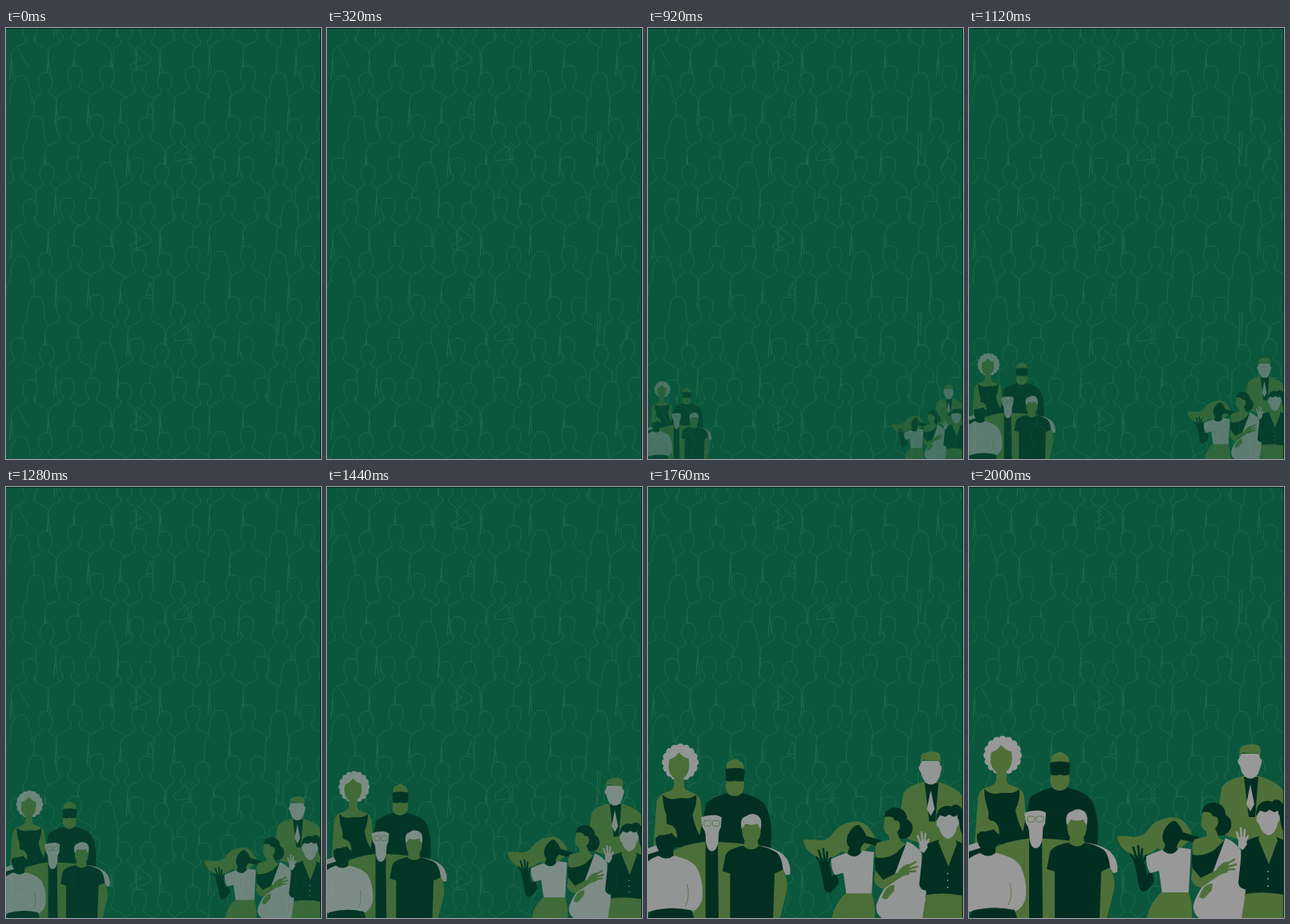
These frames come from a looping animation (393x538 px, 5000 ms). An HTML page:

```html
<!DOCTYPE html>
<html lang="en">
<head>
<meta charset="utf-8">
<title>Crowd</title>
<style>
html, body { margin: 0; width: 100%; height: 100%; overflow: hidden; background: #0a573d; }
svg { display: block; width: 100%; height: 100%; }
.crowd path { fill: #0a573d; stroke: #216b4c; stroke-width: .85; stroke-linejoin: round; }
.crowd .open { fill: none; }
.o { fill: #4e7038; }
.d { fill: #022e21; }
.g { fill: #989898; }
.line { fill: none; stroke: #4e7038; stroke-width: .8; }
.hand { fill: none; stroke-linecap: round; stroke-width: 2.6; }
.hand.d { stroke: #022e21; fill: none; }
.hand.g { stroke: #989898; fill: none; }
.hand.o { stroke: #4e7038; fill: none; }
</style>
</head>
<body>
<svg viewBox="0 0 393 538" preserveAspectRatio="none">
  <rect width="393" height="538" fill="#0a573d"/>
  <g class="crowd" id="crowd"></g>

  <g id="left">
    <!-- woman with curls -->
    <g class="g" id="curls"></g>
    <path class="o" d="M34 356 L34 366 Q33 372 24 374 Q12 377 11 390 L7 446 L74 446 L69 388 Q68 377 57 374 Q47 372 47 366 L47 356 Z"/>
    <path class="o" d="M40 322 Q46 329 53 330 Q56 347 47 355 Q40 361 33 355 Q24 347 28 331 Q36 329 40 322 Z"/>
    <path class="d" d="M19 377 Q25 383 34 383 Q42 381 50 382 Q58 382 63 377 Q64 390 58 403 Q60 420 76 446 L20 446 Q25 420 24 404 Q19 390 19 377 Z"/>
    <!-- bearded man -->
    <path class="d" d="M103 375 Q83 381 76 388 L64 446 L160 446 Q163 412 154 393 Q148 381 122 375 Z"/>
    <path class="o" d="M103 346 Q100 334 108 333 Q114 328 119 333 Q126 335 125 346 Z"/>
    <path class="d" d="M101 344 Q113 341 126 344 L125 362 L102 362 Z"/>
    <path class="o" d="M102 359 Q108 361 113 359 Q119 361 125 359 Q127 372 120 377 Q113 381 106 377 Q99 372 102 359 Z"/>
    <!-- older man in a jacket -->
    <path class="g" d="M140 443 Q166 446 177 456 Q187 466 185 481 L180 482 Q175 472 162 468 L145 466 Z"/>
    <path class="o" d="M72 439 Q46 442 32 451 L34 538 L166 538 L160 449 Q132 440 95 439 Z"/>
    <path class="d" d="M75 440 L91 440 L92 538 L75 538 Z"/>
    <path class="g" d="M69 407 Q75 404 83 404 Q91 403 96 407 L95 420 Q92 424 92 431 Q92 450 83 451 Q75 450 75 430 Q74 423 71 420 Z"/>
    <rect class="line" x="73" y="411" width="9" height="7" rx="2"/>
    <rect class="line" x="84" y="411" width="9" height="7" rx="2"/>
    <!-- man in a sweater -->
    <path class="g" d="M0 447 L12 443 L16 454 L0 459 Z"/>
    <path class="d" d="M0 455 L16 450 L16 462 L0 467 Z"/>
    <path class="g" d="M13 457 Q3 461 0 464 L0 530 L58 530 Q70 523 71 510 Q72 490 65 475 Q60 463 35 457 Z"/>
    <path class="line" d="M51 494 Q55 509 49 522"/>
    <path class="d" d="M4 529 Q30 522 57 528 L60 538 L0 538 Z"/>
    <path class="d" d="M10 430 L37 430 Q38 444 33 450 L33 457 Q24 464 14 457 L14 450 Q9 444 10 430 Z"/>
    <path class="o" d="M9 434 Q7 420 15 417 Q20 408 26 416 Q38 417 38 434 Q33 431 31 427 Q23 431 16 427 Q14 432 9 434 Z"/>
    <!-- man in a T-shirt -->
    <path class="o" d="M162 476 L176 474 Q183 490 181 502 L172 538 L160 538 Z"/>
    <path class="d" d="M123 444 Q104 448 101 456 L97 477 L107 480 L107 538 L163 538 L165 480 L176 475 Q174 455 165 451 Q156 446 146 444 Z"/>
    <path class="o" d="M123 414 L147 414 Q148 432 143 437 L144 445 Q135 452 125 445 L126 437 Q121 430 123 414 Z"/>
    <path class="g" d="M122 422 Q119 407 128 405 Q137 399 145 406 Q149 411 147 422 Q144 419 143 415 Q134 418 127 415 Q125 419 122 422 Z"/>
  </g>

  <g id="right">
    <!-- tall man in a suit -->
    <path class="o" d="M341 361 Q319 366 315 376 L307 430 L393 460 L393 381 Q388 369 362 361 Z"/>
    <path class="d" d="M343 362 L361 362 L357 412 L349 412 Z"/>
    <path class="g" d="M351 371 L356 396 L351 405 L346 396 Z"/>
    <path class="g" d="M338 333 L363 333 L363 339 Q367 339 364 348 Q361 360 357 362 Q351 366 345 362 Q340 358 338 348 Q333 342 337 339 Z"/>
    <path class="o" d="M338 337 Q336 325 342 323 Q354 319 362 323 Q365 327 363 337 L360 332 Q350 334 341 331 Z"/>
    <!-- woman with flowing hair -->
    <path class="o" d="M248 413 Q264 409 273 424 Q280 432 276 441 L265 450 Q245 457 235 451 Q222 464 205 459 Q187 453 185 436 Q192 435 200 436 Q216 439 223 428 Q232 415 248 413 Z"/>
    <path class="d" d="M243 429 Q251 415 258 417 Q264 423 267 431 L287 437 L282 444 L264 440 Q260 445 259 449 L263 461 L240 461 L245 446 Q239 440 243 429 Z"/>
    <path class="d" d="M205 466 L214 462 L220 472 L222 484 L228 478 L231 492 Q224 505 217 505 Q211 503 210 485 Z"/>
    <path class="hand d" d="M209 468 L202 459 M210 466 L205 450 M213 466 L211 448 M215 466 L216 452 M216 470 L221 460"/>
    <path class="g" d="M241 453 Q229 457 221 461 Q221 475 226 482 L237 479 L241 508 L274 508 L277 452 L262 450 Q254 464 241 453 Z"/>
    <path class="o" d="M240 506 L274 506 Q279 520 278 538 L222 538 Q226 518 240 506 Z"/>
    <!-- expecting woman -->
    <path class="d" d="M290 407 Q293 393 307 394 Q320 397 320 409 Q329 414 327 425 Q322 438 309 434 Z"/>
    <path class="o" d="M291 406 Q302 404 304 411 Q311 410 311 418 Q310 424 307 426 L312 438 L323 444 L312 462 L281 462 Q276 448 281 440 L297 436 L296 430 Q288 426 290 415 Z"/>
    <path class="d" d="M278 459 Q292 462 306 453 L322 438 L326 448 L305 486 L287 496 Q277 480 278 459 Z"/>
    <path class="g" d="M320 438 Q332 443 339 453 L341 490 Q350 515 343 538 L287 538 Q277 530 281 518 Q287 501 303 484 Z"/>
    <path class="o" d="M279 476 L289 488 L311 477 L316 482 L290 500 Q280 499 277 489 Z"/>
    <path class="o" d="M309 477 Q317 466 324 468 L323 481 L313 484 Z"/>
    <path class="hand o" d="M319 472 L331 465 M321 475 L333 471 M320 478 L331 477"/>
    <path class="o" d="M287 512 Q292 495 304 495 L303 503 L293 514 Z"/>
    <!-- woman in a vest -->
    <path class="d" d="M376 396 Q380 388 387 391 Q393 395 393 401 L393 432 Q388 422 388 410 Z"/>
    <path class="d" d="M362 436 Q343 441 341 447 L336 494 Q337 502 346 502 L344 511 L393 511 L393 441 L382 436 Z"/>
    <path class="o" d="M364 432 L382 432 L385 441 L374 471 L361 439 Z"/>
    <path class="g" d="M360 402 L386 402 L386 409 Q390 414 385 420 Q383 432 374 435 Q365 433 362 421 Q356 416 360 409 Z"/>
    <path class="d" d="M358 411 Q358 394 370 392 Q385 390 388 410 L385 404 L381 406 L375 403 L370 406 L363 404 Z"/>
    <path class="g" d="M336 438 L345 436 L347 446 L342 453 L336 450 Z"/>
    <path class="hand g" d="M337 440 L334 431 M340 439 L339 426 M343 439 L344 428 M345 442 L348 436"/>
    <path class="o" d="M345 508 Q368 504 393 509 L393 538 L340 538 Z"/>
    <g class="g"><circle cx="373" cy="480" r="1"/><circle cx="373" cy="489" r="1"/><circle cx="373" cy="498" r="1"/></g>
  </g>

  <path d="M0 .5H393M392.5 0V538" stroke="#04281d" fill="none"/>
</svg>
<script>
const $ = id => document.getElementById(id);

// Outlines relative to the top of the head
const bodies = {
  m: "M-25 76L-23 44Q-22 37 -16 34Q-6 31 -5 26L-5 22Q-9 20 -9 12Q-10 0 0 0Q10 0 9 12Q9 20 5 22L5 26Q6 31 16 34Q22 37 23 44L25 76",
  w: "M-15 76L-14 42Q-15 31 -8 29Q-3 27 -4 22Q-10 18 -9 10Q-7 0 0 0Q7 0 9 10Q10 18 4 22Q3 27 8 29Q15 31 14 42L15 76",
  l: "M-17 76L-16 40Q-15 32 -11 31Q-12 20 -9 10Q-7 0 1 0Q9 0 10 12Q10 24 12 31Q17 34 17 42L18 76",
  c: "M-19 76L-18 42Q-18 35 -12 33Q-15 27 -11 23Q-14 18 -10 13Q-11 8 -7 7Q-6 0 0 1Q7 -1 8 6Q12 9 10 14Q14 18 12 23Q17 28 13 33Q19 36 19 44L20 76"
};
const gaps = "M-25 73L-23 50L-21 73M21 73L23 50L25 73";

// Each row: base y, then "kind x dy" for every figure
const rows = [
  [47, "c18 12,w49 8,m86 0,m126 0,m166 5,w198 8,m233 1,c266 6,m302 0,l340 8,m376 0"],
  [110, "l37 0,m72 1,m113 -2,w144 8,m175 1,w214 8,w245 8,m283 0,m314 1,w360 3,m397 0"],
  [162, "m15 0,w51 8,m85 -1,c124 5,m163 0,w194 7,w228 6,m264 -1,m300 -1,w342 8,w375 1"],
  [212, "m30 2,m76 0,m108 0,w148 6,w177 6,m216 -1,w247 7,m277 -3,m319 -1,l354 4,m385 -1"]
];
const extras = [
  "M175 109L180 92L184 108Z",
  "M231 143L209 159L211 166L235 163M222 157L234 144",
  "M338 158L337 130L341 130L340 158M366 176L378 150",
  "M162 247L181 262L180 268L158 277L155 271L169 263L158 254M15 250L28 274"
];

let crowd = "";
for (let k = -1; k < 3; k++) {
  rows.forEach(([y, list], i) => {
    for (const item of list.split(",")) {
      const [x, dy] = item.slice(1).split(" ").map(Number);
      const kind = item[0];
      crowd += `<g transform="translate(${x} ${y + dy + 225 * k})"><path d="${bodies[kind]}"/>`;
      if (kind === "m") crowd += `<path class="open" d="${gaps}"/>`;
      crowd += "</g>";
    }
    crowd += `<path class="open" transform="translate(0 ${225 * k})" d="${extras[i]}"/>`;
  });
}
$("crowd").innerHTML = crowd;

let curls = '<circle cx="42" cy="335" r="21"/>';
for (let i = 0; i < 16; i++) {
  const a = i * Math.PI / 8;
  curls += `<circle cx="${42 + 19 * Math.cos(a)}" cy="${335 + 19.5 * Math.sin(a)}" r="5"/>`;
}
$("curls").innerHTML = curls;

const LOOP = 5000, GROW = 2030;

function render(t) {
  const s = t < 280 ? 0 : t >= 2000 ? 1 : (1 - Math.cos(Math.PI * t / GROW)) / 2;
  for (const [id, x] of [["left", 0], ["right", 393]]) {
    const g = $(id);
    g.setAttribute("transform", `translate(${x * (1 - s)} ${538 * (1 - s)}) scale(${s})`);
    g.setAttribute("opacity", s);
  }
}

const start = performance.now();
function tick() {
  render((performance.now() - start) % LOOP);
  requestAnimationFrame(tick);
}
tick();
</script>
</body>
</html>
```
